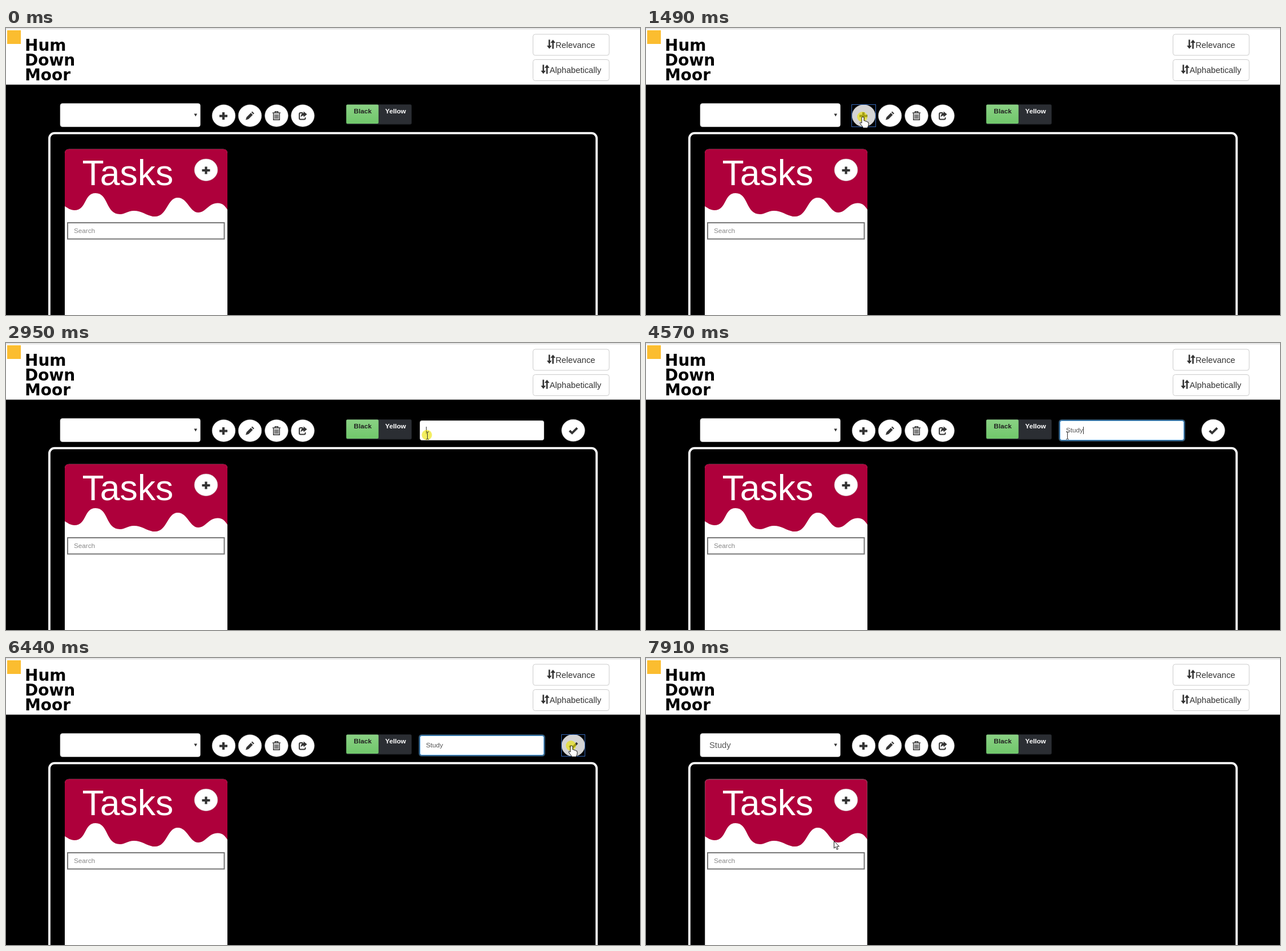
An HTML page for the animation above (7.99 s loop, 1111 px wide and 504 px high).

```html
<!DOCTYPE html>
<html lang="en">
<head>
<meta charset="utf-8">
<title>Task board</title>
<style>
html, body { margin: 0; width: 100%; height: 100%; overflow: hidden; background: #000; }
svg { display: block; font-family: "Liberation Sans", Arial, sans-serif; font-size: 14.7px; fill: #333; }
.small { font-size: 11.7px; }
.bold { font-weight: bold; }
.line { fill: none; stroke: #333; }
.ring { fill: none; stroke: #3568b8; }
.disc { fill: #fff; stroke: #ccc; stroke-width: .6; }
.cursor { fill: #fff; stroke: #000; stroke-width: .9; stroke-linejoin: round; }
</style>
</head>
<body>
<svg width="1111" height="504" viewBox="0 0 1111 504">
  <defs>
    <linearGradient id="green" x2="0" y2="1"><stop stop-color="#8ad184"/><stop offset="1" stop-color="#70c76b"/></linearGradient>
    <path id="plusIcon" class="line" stroke-width="4.2" d="M-7 0H7M0-6.500V6.500"/>
    <g id="sortIcon">
      <path d="M2.800 0h2.600v10.500h3L4.100 16-.2 10.500h3z"/>
      <path d="M9.200 16h2.600V5.500h3L10.500 0 6.200 5.500h3z"/>
    </g>
  </defs>

  <!-- header -->
  <path fill="#fff" d="M0 0H1111V99.500H0z"/>
  <path fill="#c9c9c9" d="M0 1H1111V2H0z"/>
  <rect x="2" y="4" width="24" height="24" fill="#fbbd30"/>
  <g font-family="DejaVu Sans, sans-serif" font-weight="bold" font-size="28" fill="#000">
    <text x="33" y="40">Hum</text><text x="33" y="66">Down</text><text x="33" y="92">Moor</text>
  </g>
  <g fill="#fff" stroke="#ccc">
    <rect x="923.5" y="11" width="133.500" height="37" rx="4"/>
    <rect x="923.5" y="55.5" width="133.500" height="37" rx="4"/>
  </g>
  <use href="#sortIcon" x="948" y="20.500"/><text x="963" y="34.500">Relevance</text>
  <use href="#sortIcon" x="937.500" y="64.500"/><text x="952.500" y="79">Alphabetically</text>

  <!-- toolbar -->
  <rect x="95" y="132.500" width="245.500" height="41" rx="4" fill="#fff" stroke="#ccc" stroke-width=".6"/>
  <path d="M329.500 150.500h5.500l-2.750 5z"/>
  <text id="choice" x="111" y="157.500" fill="#555">Study</text>
  <g transform="translate(381.500 154)"><ellipse class="disc" rx="20.300" ry="19.300"/><use href="#plusIcon" x="-.5" y=".5"/></g>
  <g transform="translate(427.500 154)"><ellipse class="disc" rx="20.300" ry="19.300"/>
    <path d="M-7.500 7.500-6 2.500 1.500-5 5-1.500-2.500 6zM2.500-6 4-7.500 7.500-4 6-2.500z"/></g>
  <g transform="translate(474 154)"><ellipse class="disc" rx="20.300" ry="19.300"/>
    <path class="line" stroke-width="1.500" d="M-7-5H7M-2.500-5V-7.300H2.500V-5M-5.300-4V7.300H5.300V-4M-2.500-2.500V5.500M0-2.500V5.500M2.500-2.500V5.500"/></g>
  <g transform="translate(520 154)"><ellipse class="disc" rx="20.300" ry="19.300"/>
    <path class="line" stroke-width="1.900" d="M0-5H-4Q-6-5-6-3V4.500Q-6 6.500-4 6.500H2.500Q4.500 6.500 4.500 4.500V3"/>
    <path d="M1.500-7.500 7.500-2.500 1.500 2.500V-.3Q-2-.3-3.500 3-3.500-4.500 1.500-4.700z"/></g>
  <rect id="addRing" class="ring" x="360.500" y="134.500" width="42" height="39"/>

  <rect x="596.500" y="134.500" width="114" height="34.500" rx="2" fill="#2b2e33" stroke="#1f2226"/>
  <rect x="596.300" y="134.500" width="56.500" height="33.500" rx="2" fill="url(#green)"/>
  <text class="small bold" x="609.500" y="150" fill="#222">Black</text>
  <text class="small bold" x="664.500" y="150" fill="#fff">Yellow</text>

  <!-- new board form -->
  <g id="form">
    <rect x="725.500" y="136.500" width="217" height="34" rx="3" fill="#fff" stroke="#ccc"/>
    <g id="glow" fill="none">
      <rect x="724.500" y="135.500" width="219" height="36" rx="4" stroke="#66afe9" stroke-opacity=".45" stroke-width="3"/>
      <rect x="725.500" y="136.500" width="217" height="34" rx="3" stroke="#3f96dd"/>
    </g>
    <text id="typed" class="small" x="736" y="157" fill="#555"></text>
    <path id="caret" d="M0 147h1v13H0z"/>
    <g transform="translate(994 153.500)"><ellipse class="disc" rx="20.300" ry="19.300"/>
      <path class="line" stroke-width="3.800" d="M-6.500.5-2 4.700 7-4.300"/></g>
    <rect id="okRing" class="ring" x="973.500" y="134.500" width="41" height="38"/>
  </g>

  <!-- board -->
  <rect x="76" y="184.700" width="959" height="360" rx="9" fill="none" stroke="#fff" stroke-width="3.800"/>
  <rect x="103" y="212.700" width="285" height="320" rx="7" fill="#fff"/>
  <path fill="#ae003b" d="M103 313C108 316 113 320 120 320C142 320 136 290 157 290C180 290 174 327 200 327C209 327 213 321 224 321C240 321 247 331 261 331C283 331 282 298 301 298C318 298 322 324 337 324C350 324 355 307.500 371 307.500C380 307.500 384 313 388 319V220Q388 212.700 381 212.700H110Q103 212.700 103 220z"/>
  <path id="cardEdge" fill="none" stroke="#777" stroke-opacity=".5" d="M103.500 504V220Q103.500 213.500 110 213.500H381Q387.500 213.500 387.500 220V504"/>
  <text x="133.500" y="275.500" font-size="62.500" fill="#fff">Tasks</text>
  <g transform="translate(350.500 249.200)"><ellipse class="disc" rx="20.300" ry="19.300"/><use href="#plusIcon" y=".8"/></g>
  <rect x="108" y="342" width="274.500" height="28.500" fill="#fff" stroke="#777" stroke-width="2"/>
  <text class="small" x="119" y="360" fill="#888">Search</text>

  <!-- pointer -->
  <g id="pointer">
    <circle id="press" cx="-1" cy="-1" r="9" fill="#ece400" fill-opacity=".62"/>
    <path id="arrow" class="cursor" d="M0 0V12.600L2.800 10 5 15 7 14 5 9.400H9z"/>
    <path id="hand" class="cursor" d="M-2 1Q-2-1 0-1T2 1V6Q4 5 5 7 7 6 7.500 8 10 7.500 10 10V13Q10 15 8.500 17V18.500H0V17L-5 10.500Q-5.500 8-2 10z"/>
    <path id="beam" class="line" d="M-2.500-6.500H-.8L0-5.500.8-6.500H2.500M0-5.500V5.500M-2.500 6.500H-.8L0 5.500.8 6.500H2.500"/>
  </g>
</svg>
<script>
const LOOP = 7990;
const $ = id => document.getElementById(id);
const show = (id, on) => $(id).setAttribute("visibility", on ? "inherit" : "hidden");
const within = (t, a, b) => t >= a && t < b;
const during = (t, spans) => spans.some(([a, b]) => within(t, a, b));

// pointer moves: first step, last step, number of steps, end point
const moves = [
  [70, 70, 1, 982, 484], [120, 170, 2, 856, 367], [400, 550, 3, 570, 247],
  [800, 1020, 4, 426, 160], [1090, 1320, 4, 380, 157],
  [1870, 1945, 2, 634, 173], [2025, 2260, 4, 702, 177], [2330, 2640, 5, 738, 163],
  [2720, 2720, 1, 738.5, 162.5],
  [5200, 5900, 10, 976, 173], [5970, 6210, 4, 991, 155],
  [6970, 7130, 3, 392, 382], [7360, 7910, 8, 329.5, 321.5]
];
const presses = [[1490, 1720], [2950, 3100], [6440, 6510]];
const keys = [3790, 3960, 4190, 4340, 4570];
const blinks = [[2950, 3490], [3790, 5120], [5620, 6120]];
const discs = [...document.querySelectorAll(".disc")].map(el => {
  const { e, f } = el.parentNode.transform.baseVal[0].matrix;
  return { el, x: e, y: f, inForm: $("form").contains(el) };
});

function pointerAt(t) {
  let x = 982, y = 484;
  for (const [start, end, steps, toX, toY] of moves) {
    if (t < start) break;
    const gap = (end - start) / (steps - 1) || 1;
    const p = Math.min(1, (Math.floor((t - start) / gap) + 1) / steps);
    const k = 1 - (1 - p) ** 1.5;
    x += (toX - x) * k;
    y += (toY - y) * k;
  }
  return [x, y];
}

function draw(t) {
  const [x, y] = pointerAt(t);
  const form = within(t, 1720, 6590);
  const pressed = during(t, presses);
  const addFocus = within(t, 1490, 2950);

  let onButton = false;
  discs.forEach((d, i) => {
    const hover = t >= 70 && (form || !d.inForm) && Math.hypot(x - d.x, y - d.y) < 20;
    onButton ||= hover;
    d.el.style.fill = hover && pressed ? "#d4d4d4" : hover || (i === 0 && addFocus) ? "#e6e6e6" : "#fff";
  });

  show("form", form);
  show("choice", t >= 6590);
  show("addRing", addFocus);
  show("okRing", t >= 6440 && form);
  $("glow").style.opacity = t < 6450
    ? Math.max(0, Math.min(1, (t - 2960) / 150))
    : Math.max(0, 1 - (t - 6450) / 150);
  $("typed").textContent = "Study".slice(0, keys.filter(k => t >= k).length);
  $("caret").setAttribute("transform", `translate(${Math.round(736 + $("typed").getComputedTextLength())})`);
  show("caret", form && during(t, blinks));

  const onInput = form && x > 725 && x < 943 && y > 136 && y < 171;
  show("pointer", t >= 70);
  show("press", pressed);
  show("hand", onButton);
  show("beam", onInput);
  show("arrow", !onButton && !onInput);
  $("pointer").setAttribute("transform", `translate(${x} ${y})`);
  show("cardEdge", x > 103 && x < 388 && y > 213);
}

const began = performance.now();
function tick() {
  draw((performance.now() - began) % LOOP);
  requestAnimationFrame(tick);
}
tick();
</script>
</body>
</html>
```
